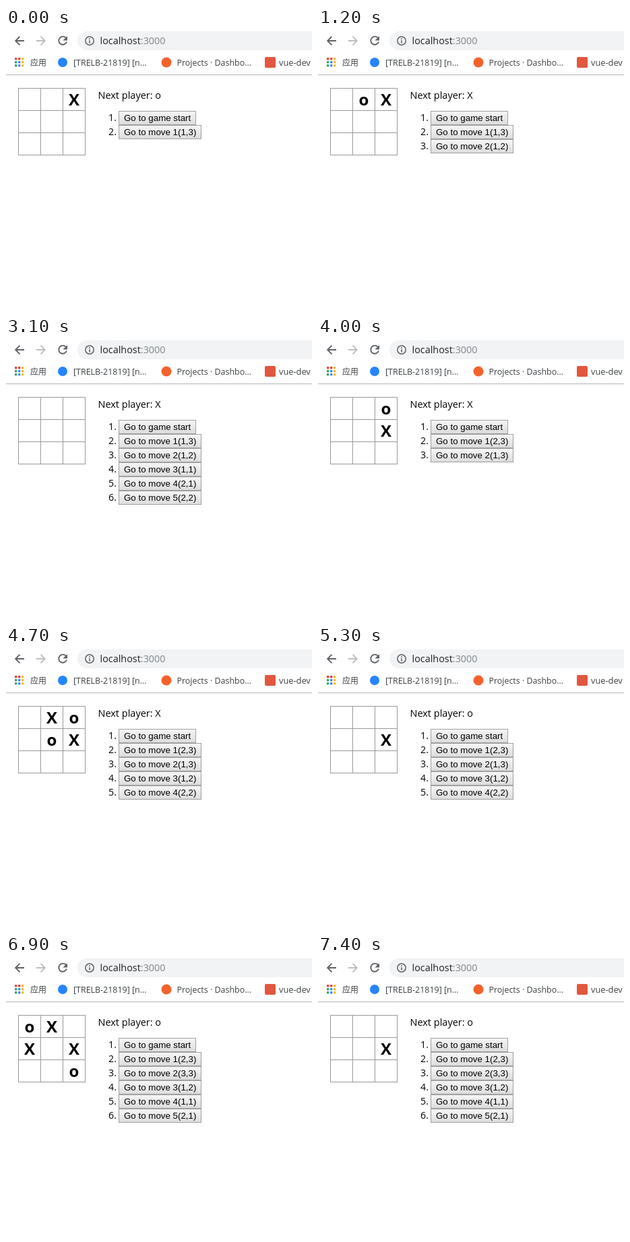
Write an HTML page that moves like this. It is 454 px wide and 417 px high and loops after 8 s.

```html
<!DOCTYPE html>
<html lang="en">
<head>
<meta charset="utf-8">
<title>Tic-tac-toe history</title>
<style>
  html, body { margin: 0; width: 100%; height: 100%; overflow: hidden; background: #fff; }
  svg { display: block; width: 454px; height: 417px; }
  text { font-family: "Open Sans", "Noto Sans", "Noto Sans CJK SC", "Noto Sans CJK", sans-serif; fill: #000; white-space: pre; }
  .url { font-size: 14.4px; fill: #202124; }
  .dim { fill: #80868b; }
  .mark { font-size: 12.45px; fill: #3c4043; }
  .page { font-size: 14.5px; }
  .piece { font-size: 24px; font-weight: 700; text-anchor: middle; }
  .num { font-size: 14.2px; text-anchor: end; }
  .label { font-family: "Liberation Sans", Arial, sans-serif; font-size: 13.333px; }
  .icon { fill: none; stroke: #5f6368; stroke-width: 1.9; }
</style>
</head>
<body>
<svg viewBox="0 0 454 417">
  <defs>
    <linearGradient id="normal" x2="0" y2="1"><stop stop-color="#f6f6f6"/><stop offset="1" stop-color="#dcdcdc"/></linearGradient>
    <linearGradient id="hover" x2="0" y2="1"><stop stop-color="#fbfbfb"/><stop offset="1" stop-color="#e8e8e8"/></linearGradient>
    <linearGradient id="pressed" x2="0" y2="1"><stop stop-color="#dcdcdc"/><stop offset="1" stop-color="#ededed"/></linearGradient>
  </defs>

  <!-- address row -->
  <rect x="106" y="5" width="380" height="28" rx="14" fill="#f1f3f4"/>
  <path class="icon" d="M27 19H14.5M20.5 12.7L14.2 19l6.3 6.3"/>
  <path class="icon" style="stroke:#bcbec1" d="M45 19h12.5M51.5 12.7l6.3 6.3l-6.3 6.3"/>
  <path class="icon" d="M89.2 15.2A6 6 0 1 0 90 20.5"/>
  <path d="M91 12v6.6h-6.6z" fill="#5f6368"/>
  <circle class="icon" cx="124" cy="19" r="6.2" style="stroke-width:1.5"/>
  <path class="icon" d="M124 15.2v1.7M124 18.2v4.3" style="stroke-width:1.6"/>
  <text class="url" x="139.5" y="24">localhost<tspan class="dim">:3000</tspan></text>

  <!-- bookmark row -->
  <g id="apps"></g>
  <text class="mark" x="36" y="56" style="font-size:12px">应用</text>
  <circle cx="84" cy="51" r="7" fill="#2684ff"/>
  <text class="mark" x="100" y="56">[TRELB-21819] [n…</text>
  <circle cx="238" cy="51" r="7.5" fill="#f4622b"/>
  <text class="mark" x="253.5" y="56">Projects · Dashbo…</text>
  <rect x="384" y="43" width="16" height="16" rx="2" fill="#e2573f"/>
  <text class="mark" x="405" y="56" style="font-size:12.8px">vue-dev</text>
  <rect y="69" width="454" height="1" fill="#b4b4b4"/>

  <!-- page -->
  <path d="M18 89.5h100M18 122.5h100M18 155.5h100M18 188.5h100M18.5 89v100M51.5 89v100M84.5 89v100M117.5 89v100"
        fill="none" stroke="#999" shape-rendering="crispEdges"/>
  <g id="board"></g>
  <text class="page" id="status" x="136.5" y="105"></text>
  <g id="list"></g>
</svg>
<script>
const LOOP = 8000;

// Each move is row then column; X always opens.
const games = [
  ["13", "12", "11", "21", "22"],
  ["23", "13", "12", "22"],
  ["23", "33", "12", "11", "21"]
];

// time, game, moves in the list, moves on the board, active button, its look
const steps = [
  [0, 0, 1, 1],
  [1200, 0, 2, 2],
  [1700, 0, 3, 3],
  [2100, 0, 4, 4],
  [2400, 0, 5, 5],
  [2600, 0, 5, 5, 0, "hover"],
  [2900, 0, 5, 5, 0, "pressed"],
  [3000, 0, 5, 0, 0, "hover"],
  [3100, 0, 5, 0],
  [3600, 1, 1, 1],
  [4000, 1, 2, 2],
  [4400, 1, 3, 3],
  [4700, 1, 4, 4],
  [4800, 1, 4, 4, 1, "hover"],
  [5100, 1, 4, 1, 1, "hover"],
  [5300, 1, 4, 1],
  [5600, 2, 2, 2],
  [6000, 2, 3, 3],
  [6500, 2, 4, 4],
  [6900, 2, 5, 5],
  [7000, 2, 5, 5, 1, "hover"],
  [7300, 2, 5, 1, 1, "hover"],
  [7400, 2, 5, 1]
];

const byId = id => document.getElementById(id);
const player = turn => turn % 2 ? "o" : "X";

function piece(move, turn) {
  const [row, col] = move;
  return `<text class="piece" x="${2 + 33 * col}" y="${82 + 33 * row}">${player(turn)}</text>`;
}

function button(label, i, look = "normal") {
  const y = 123 + 21 * i;
  const width = i ? 123 : 115;
  const edge = look === "normal" ? "#a0a0a0" : "#787878";
  return `<text class="num" x="164" y="${y + 15}">${i + 1}.</text>
    <rect x="167.5" y="${y + 0.5}" width="${width - 1}" height="20" fill="url(#${look})" stroke="${edge}"/>
    <text class="label" x="175" y="${y + 15}">${label}</text>`;
}

function draw([, game, listed, shown, active, look]) {
  const moves = games[game].slice(0, listed);
  const labels = ["Go to game start",
    ...moves.map(([row, col], i) => `Go to move ${i + 1}(${row},${col})`)];
  byId("board").innerHTML = moves.slice(0, shown).map(piece).join("");
  byId("status").textContent = "Next player: " + player(shown);
  byId("list").innerHTML = labels
    .map((label, i) => button(label, i, i === active ? look : "normal")).join("");
}

const dots = ["#ea4335", "#ea4335", "#fbbc05", "#34a853", "#4285f4", "#fbbc05", "#34a853", "#4285f4", "#fbbc05"];
byId("apps").innerHTML = dots.map((color, i) =>
  `<rect x="${13 + i % 3 * 5}" y="${44 + Math.floor(i / 3) * 5}" width="3.4" height="3.4" rx="0.8" fill="${color}"/>`).join("");

let current;
function tick() {
  const time = performance.now() % LOOP;
  const step = steps.filter(s => s[0] <= time).pop();
  if (step !== current) draw(current = step);
  requestAnimationFrame(tick);
}
tick();
</script>
</body>
</html>
```
